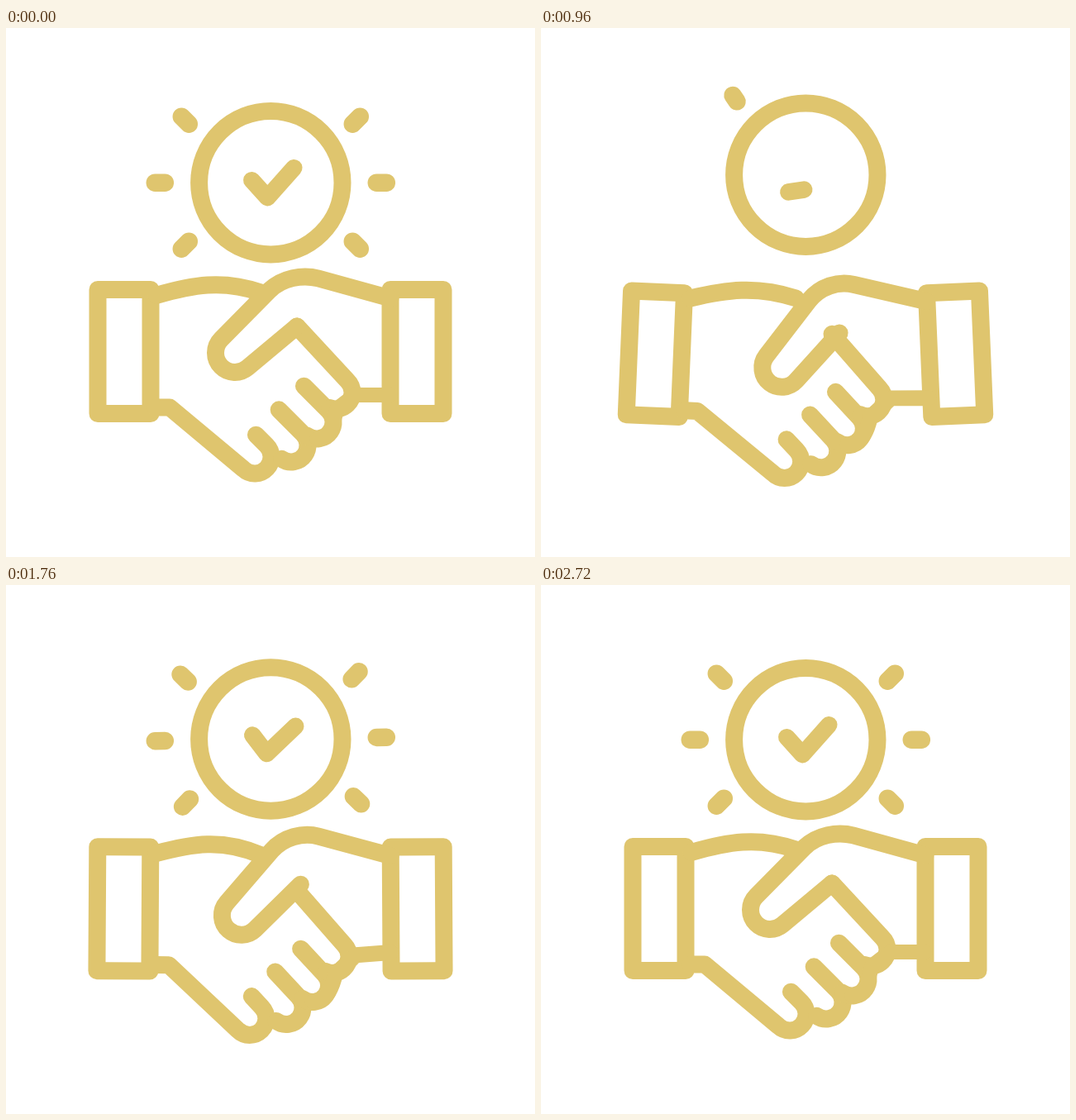
An HTML page with a canvas for the animation above (3600 ms loop, 640 by 640 pixels).

```html
<!DOCTYPE html>
<html lang="en">
<head>
<meta charset="utf-8">
<title>Handshake</title>
<style>
html, body { margin: 0; width: 100%; height: 100%; overflow: hidden; background: #fff; }
canvas { display: block; width: 640px; height: 640px; }
</style>
</head>
<body>
<canvas id="stage" width="640" height="640"></canvas>
<script>
const ctx = document.getElementById('stage').getContext('2d');
const LOOP = 3600, STEP = 40, RAD = Math.PI / 180;

const clamp = v => Math.max(0, Math.min(1, v));
const polar = ([x, y], r, deg) => [x + r * Math.cos(deg * RAD), y + r * Math.sin(deg * RAD)];

// Cosine easing through a chain of [time, value] turning points
function swing(t, ...turns) {
  let value = turns[0][1];
  for (let i = 1; i < turns.length; i++) {
    const [t0, v0] = turns[i - 1], [t1, v1] = turns[i];
    value += (v1 - v0) * (1 - Math.cos(Math.PI * clamp((t - t0) / (t1 - t0)))) / 2;
  }
  return value;
}

// Two shakes: up to the top, back to the dip, up again, then to rest
const shake = (t, top, low, peak1, dip, peak2, end) =>
  swing(t, [0, 0], [peak1, top], [dip, low], [peak2, top], [end, 0]);

function stroke(width, trace) {
  ctx.lineWidth = width;
  ctx.beginPath();
  trace();
  ctx.stroke();
}
const line = (...points) => points.forEach(p => ctx.lineTo(...p));
const arc = ([x, y], r, from, to, ccw) => ctx.arc(x, y, r, from * RAD, to * RAD, ccw);

function drawCuffs(c) {
  for (const side of [1, -1]) {
    ctx.save();
    ctx.translate(320, 0);
    ctx.scale(side, 1);
    ctx.translate(-209 - 3.5 * c, 316.5 + 3.5 * c);
    ctx.rotate(5.8 * c * RAD);
    ctx.lineWidth = 21;
    ctx.strokeRect(0, 0, 64, 150);
    ctx.restore();
  }
}

// c moves the wrists, f the fingers, th the thumb
function drawHands(c, f, th) {
  const blend = (k, x0, y0, x1, y1) => [x0 + (x1 - x0) * k, y0 + (y1 - y0) * k];
  const wrist = (...p) => blend(c, ...p);
  const back = (...p) => blend((c + f) / 2, ...p);
  const mix = (...p) => {
    const [x, y] = blend(f, ...p);
    return [x, y + 9 * f * (1 - f)];
  };
  const bend = (x, y, cx, cy, tx = 0, ty = 0) => [x + cx * c + tx * th, y + cy * c + ty * th];
  const tilt = 45 + 15 * f;

  // Left hand: back, then the lower edge and fingers
  stroke(21, () => {
    ctx.moveTo(...back(182, 323.5, 178, 336));
    ctx.bezierCurveTo(...back(225, 311, 220, 332), ...back(262, 304, 256, 330), ...mix(308, 320, 310, 360));
  });
  const fingers = [
    [mix(301, 519, 257, 550), 18],
    [mix(345, 505, 302, 544), 41],
    [mix(376, 477, 337, 523), 42]
  ];
  fingers.forEach(([center, length], i) => stroke(21, () => {
    if (i === 0) line(wrist(181, 459, 164, 468), wrist(198, 459, 177, 470));
    arc(center, 20, tilt + (i ? 80 : 88), tilt - 90, true);
    line(polar(polar(center, 20, tilt - 90), -length, tilt));
  }));

  // Right hand: index finger and lower edge
  stroke(21, () => {
    const index = mix(399, 441, 370, 493);
    line(mix(352, 361, 352, 418));
    arc(index, 20, tilt - 90, tilt + 67);
  });
  stroke(18 + 3 * clamp(f * 2), () => {
    line(wrist(465, 444, 475, 453), mix(422, 444, 432, 463), mix(400, 461, 388, 523));
    ctx.quadraticCurveTo(...mix(395, 488, 378, 538), ...mix(384, 495, 360, 538));
    line(mix(376, 497, 340, 540));
  });

  // Right hand: back and thumb
  stroke(21, () => {
    line(bend(465, 327, 4, 9), bend(378, 303, 2, 18));
    ctx.bezierCurveTo(...bend(359, 298, 1, 18.5), ...bend(334, 302, 0, 18.5, 7, 6.5), ...bend(318, 318, 0, 18.5, 12, 8.5));
    arc(bend(277, 393, 1, 18.5, 28, 20.5), 23.5, 225 - 15 * th, 50 - 15 * th, true);
    line(bend(352, 361, 4, 18.5, 15, .5));
  });
}

function drawBadge(t, rise, turn, tilt, drawn) {
  ctx.save();
  ctx.translate(320.3, 187.2 + rise);
  stroke(21, () => ctx.arc(0, 0, 86.7, 0, 7));

  // Rays leave and return one after another
  ctx.save();
  ctx.rotate(turn * RAD);
  const rays = [[-1, -1], [-1, 0], [-1, 1], [1, -1], [1, 1], [1, 0]];
  rays.forEach(([sx, sy], i) => {
    const growing = t > 850;
    const progress = clamp((t - (growing ? 880 : 100) - 104 * i) / 115);
    const k = growing ? progress : 1 - progress;
    if (!k) return;
    const at = u => sy ? [sx * (99 + 9 * u), sy * (71 + 9 * u)] : [sx * (128 + 12 * u), 0];
    const from = growing ? 0 : .4 * (1 - k);
    stroke(21.5, () => line(at(from), at(growing ? k : .4 + .6 * k)));
  });
  ctx.restore();

  if (drawn > 0) {
    ctx.translate(0, 7);
    ctx.rotate(tilt * RAD);
    ctx.setLineDash([76.5 * drawn, 200]);
    stroke(20.5, () => line([-23, -10], [-4, 11], [28, -25]));
  }
  ctx.restore();
}

function draw(t) {
  ctx.fillStyle = '#fff';
  ctx.fillRect(0, 0, 640, 640);
  ctx.strokeStyle = '#dfc56e';
  ctx.lineCap = ctx.lineJoin = 'round';

  const cuff = shake(t, 1.22, .3, 558, 1080, 1400, 1818);
  const finger = shake(t, 1.08, 0, 640, 1060, 1433, 1860);
  const thumb = shake(t, 1.02, 0, 680, 1230, 1500, 1900);
  drawCuffs(cuff);
  drawHands(cuff, finger, thumb);

  const rise = shake(t, -48, 10, 575, 1210, 1420, 1790);
  const turn = swing(t, [0, 0], [540, -12], [800, 11.2], [1400, 11.2], [2000, -7.3], [2300, 0]);
  const tilt = swing(t, [100, 0], [900, -60], [1370, 21], [1560, 21], [2000, -17], [2720, 0]);
  const drawn = clamp(t < 850 ? (830 - t) / 690 : (t - 880) / 320);
  drawBadge(t, rise, turn, tilt, drawn);
}

const start = performance.now();
function play() {
  const t = (performance.now() - start) % LOOP;
  draw(Math.floor(t / STEP) * STEP);
  requestAnimationFrame(play);
}
play();
</script>
</body>
</html>
```
